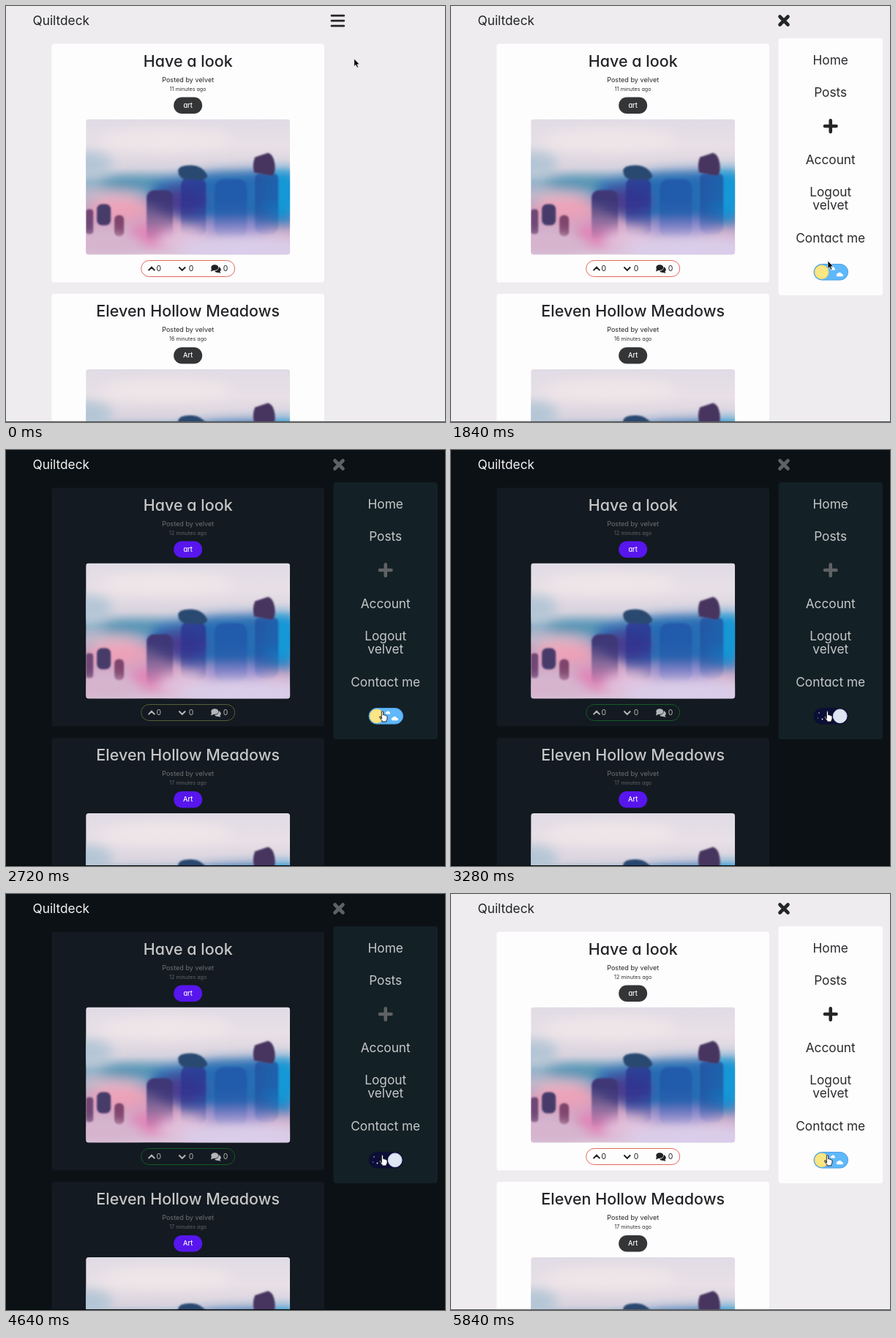
Animation of 600x568 px, one loop 5920 ms. Source, as an HTML page:

```html
<!DOCTYPE html>
<html lang="en">
<head>
<meta charset="utf-8">
<title>Theme toggle</title>
<style>
html, body { margin: 0; width: 100%; height: 100%; overflow: hidden; background: #eeecee; }
svg { display: block; }
#stage {
  --bg: #eeecee; --card: #fefdfe; --menu: #fefdfe; --brand: #222427; --title: #222427;
  --item: #2a2b2d; --meta: #25272a; --time: #303235; --tag: #343536; --icon: #202124;
  --close: #242527; --edge: #55585a;
  font-family: Inter, Lato, sans-serif; font-feature-settings: "cv11";
}
#stage.dark {
  --bg: #0b1115; --card: #131a21; --menu: #132026; --brand: #f3f3f3; --title: #c6c6c6;
  --item: #c6c8c9; --meta: #6c7073; --time: #5f6366; --tag: #5716ed; --icon: #b4b6b8;
  --close: #5f6264; --edge: #05080a;
}
.bg { fill: var(--bg); }
.card { fill: var(--card); }
.menu { fill: var(--menu); }
.brand { fill: var(--brand); font-size: 17.3px; }
.title { fill: var(--title); font-size: 21.5px; font-weight: 500; }
.item { fill: var(--item); font-size: 17.3px; }
.meta { fill: var(--meta); font-size: 9.1px; }
.time { fill: var(--time); font-size: 7.2px; }
.tag { fill: var(--tag); }
.tagText { fill: #fff; font-size: 9.2px; font-weight: 500; }
.count { fill: var(--icon); font-size: 10.5px; }
.icon { fill: var(--icon); }
.chevron { fill: none; stroke: var(--icon); stroke-width: 2; }
.close { stroke: var(--close); stroke-width: 4.6; stroke-linecap: round; }
.mid text { text-anchor: middle; }
.edge { fill: var(--edge); }
</style>
</head>
<body>
<svg id="stage" width="600" height="568" viewBox="0 0 600 568">
  <defs>
    <linearGradient id="sky" x2="0" y2="1">
      <stop stop-color="#e0dbe5"/>
      <stop offset=".2" stop-color="#e8e0e6"/>
      <stop offset=".36" stop-color="#d9d3de"/>
      <stop offset=".46" stop-color="#8db2c8"/>
      <stop offset=".56" stop-color="#a3adc8"/>
      <stop offset=".7" stop-color="#cd9fc0"/>
      <stop offset="1" stop-color="#dac8dd"/>
    </linearGradient>
    <linearGradient id="fade" x2="0" y2="1">
      <stop offset=".35" stop-color="#fff"/>
      <stop offset="1" stop-color="#fff" stop-opacity="0"/>
    </linearGradient>
    <filter id="haze" x="-60%" y="-60%" width="220%" height="220%"><feGaussianBlur stdDeviation="8"/></filter>
    <filter id="soft" x="-20%" y="-20%" width="140%" height="140%"><feGaussianBlur stdDeviation="1"/></filter>
    <clipPath id="frame"><rect width="279" height="185" rx="4"/></clipPath>
    <mask id="sink"><rect y="75" width="279" height="92" fill="url(#fade)"/></mask>
    <g id="photo" clip-path="url(#frame)">
      <rect width="279" height="185" fill="url(#sky)"/>
      <g filter="url(#haze)">
        <ellipse cx="110" cy="28" rx="90" ry="14" fill="#efe6e8"/>
        <ellipse cx="2" cy="62" rx="34" ry="18" fill="#b4c6d6"/>
        <ellipse cx="72" cy="88" rx="54" ry="8" fill="#4a8db0"/>
        <ellipse cx="22" cy="104" rx="50" ry="6" fill="#d3bdcb"/>
        <path d="M95 84L180 72 285 68V145L215 140 130 138 85 112Z" fill="#286cb4"/>
        <ellipse cx="268" cy="102" rx="28" ry="34" fill="#1497d6"/>
        <ellipse cx="130" cy="112" rx="34" ry="20" fill="#4a3c90"/>
        <ellipse cx="45" cy="123" rx="42" ry="15" fill="#eda2b8"/>
        <ellipse cx="92" cy="158" rx="34" ry="17" fill="#df85b6"/>
        <ellipse cx="205" cy="150" rx="48" ry="12" fill="#9c93d2"/>
      </g>
      <g filter="url(#soft)">
        <g mask="url(#sink)">
          <rect x="83" y="97" width="36" height="70" rx="10" fill="#3f3876"/>
          <rect x="130" y="80" width="34" height="80" rx="10" fill="#2c3290" opacity=".8"/>
          <rect x="176" y="82" width="44" height="80" rx="12" fill="#2050a6" opacity=".6"/>
          <rect x="231" y="72" width="32" height="85" rx="10" fill="#214f9f" opacity=".75"/>
        </g>
        <path d="M126 70Q128 62 145 63 160 64 166 77 166 83 155 83L134 82Q126 79 126 70Z" fill="#2b4871"/>
        <path d="M231 52L249 46Q256 48 258 60 260 75 254 77L230 73Q227 62 231 52Z" fill="#46345f"/>
        <rect x="0" y="123" width="10" height="34" rx="4" fill="#704675"/>
        <rect x="15" y="116" width="19" height="29" rx="7" fill="#463a6a"/>
        <rect x="39" y="131" width="13" height="29" rx="6" fill="#80446d"/>
      </g>
      <g filter="url(#haze)">
        <ellipse cx="28" cy="172" rx="52" ry="14" fill="#d6b3cd"/>
        <ellipse cx="130" cy="166" rx="32" ry="16" fill="#e2c3dd" opacity=".9"/>
        <ellipse cx="215" cy="178" rx="85" ry="18" fill="#dacdea"/>
      </g>
    </g>
  </defs>

  <rect class="bg" width="600" height="568"/>
  <text class="brand" x="36.5" y="26">Quiltdeck</text>
  <g id="feed"></g>

  <path id="bars" d="M445 13.2H461.8M445 20.2H461.8M445 27.2H461.8" stroke="#242527" stroke-width="2.8" stroke-linecap="round"/>

  <g id="nav">
    <path class="close" d="M449.5 14.5L460.5 25.5M460.5 14.5L449.5 25.5"/>
    <rect class="menu" x="447.5" y="44" width="142.5" height="351" rx="4"/>
    <g id="items" class="mid"></g>
    <path class="close" d="M511 164H526.5M518.75 156.2V171.8"/>
    <rect id="track" x="496" y="352.5" width="46.6" height="21.6" rx="10.8"/>
    <g id="clouds" fill="#fff">
      <path d="M519.5 360.5a1.6 1.6 0 0 1 .6-3 2.3 2.3 0 0 1 4.2.8 1.2 1.2 0 0 1 .3 2.2Z"/>
      <path d="M528 369.3a2.1 2.1 0 0 1 .4-4 3.2 3.2 0 0 1 5.8 .6 1.8 1.8 0 0 1 .8 3.4Z"/>
    </g>
    <g id="stars" fill="#fff">
      <circle cx="503" cy="359" r=".7"/><circle cx="507.5" cy="367.5" r=".9"/>
      <circle cx="514" cy="357.5" r=".7"/><circle cx="501.5" cy="366" r=".5"/>
    </g>
    <circle id="knob" cy="363.3" r="9.4" stroke-width="1"/>
  </g>

  <rect class="edge" y="567" width="600" height="1"/>
  <path id="arrow" d="M0 0V10.6L2.4 8.4 4 12.2 5.9 11.4 4.3 7.7H7.6Z" fill="#050505" stroke="#fff" stroke-width=".7"/>
  <path id="hand" d="M-1.7 4V-5Q-1.7 -6.4 -.6 -6.4T.6 -5V-1.2Q2.2 -2 2.7 -.8 4.2 -1.3 4.6 0 6 -.2 6 1.4V3.4Q6 5.3 4.7 6.8V8H-.9V6.8Q-2.6 5.1 -4.4 1.9 -4.6 .4 -3.2 .7Z" fill="#fff" stroke="#111" stroke-width=".9"/>
</svg>
<script>
const LOOP = 5920, STEP = 80;
const OPEN = 800, NIGHT = 2480, DAY = 4880, GRAB = 1960;
const $ = id => document.getElementById(id);

const card = (top, title, tag) => `
  <g transform="translate(0 ${top})">
    <rect class="card" x="62.3" y="0" width="372.7" height="326" rx="4"/>
    <g class="mid">
      <text class="title" x="248.7" y="31">${title}</text>
      <text class="meta" x="248.7" y="52">Posted by velvet</text>
      <text class="time" x="248.7" y="64.3"></text>
      <rect class="tag" x="229.2" y="73" width="39" height="22.6" rx="11.3"/>
      <text class="tagText" x="248.7" y="87.2">${tag}</text>
    </g>
    <use href="#photo" x="109.2" y="103"/>
    <rect class="votes" x="184.7" y="296" width="128" height="22" rx="11" fill="none"/>
    <path class="chevron" d="M194.6 309.6L199 305.2 203.4 309.6M236.4 305L240.8 309.4 245.2 305"/>
    <g class="icon">
      <ellipse cx="285.3" cy="305.6" rx="5" ry="3.9"/>
      <path d="M281.2 306L280 311 285 309ZM291 304.6Q296 308 292.4 311.3L293.6 313.2 290 312.4Q286.4 312.6 285 310.4 291 309.8 291 304.6Z"/>
    </g>
    <g class="count">
      <text x="205.6" y="310.8">0</text><text x="249.8" y="310.8">0</text><text x="296.8" y="310.8">0</text>
    </g>
  </g>`;

$('feed').innerHTML = card(51.5, 'Have a look', 'art') + card(393, 'Eleven Hollow Meadows', 'Art');
$('items').innerHTML = [['Home', 80], ['Posts', 124], ['Account', 216], ['Logout', 260], ['velvet', 278], ['Contact me', 323]]
  .map(([label, y]) => `<text class="item" x="518.7" y="${y}">${label}</text>`).join('');

const times = document.querySelectorAll('.time');
const votes = document.querySelectorAll('.votes');
// time, x, y of the pointer tip
const path = [[0, 475.7, 72], [160, 475.7, 72], [600, 457.5, 22], [960, 457.5, 22], [1280, 566, 72], [1840, 515, 348], [GRAB, 515, 363]];

const ramp = (t, from, span) => Math.min(1, Math.max(0, (t - from) / span));
const smooth = u => u * u * (3 - 2 * u);
const easeOut = u => 1 - (1 - u) ** 2;
const mix = (a, b, u) => a + (b - a) * u;
const blend = (a, b, u) => `rgb(${a.map((v, i) => Math.round(mix(v, b[i], u)))})`;
const show = (id, on) => $(id).setAttribute('visibility', on ? 'visible' : 'hidden');
const place = (id, x, y) => $(id).setAttribute('transform', `translate(${x} ${y})`);

function pointer(t) {
  const i = path.findIndex(p => p[0] > t);
  if (i < 0) return path[path.length - 1].slice(1);
  const [t0, x0, y0] = path[i - 1], [t1, x1, y1] = path[i];
  const u = smooth(ramp(t, t0, t1 - t0));
  return [mix(x0, x1, u), mix(y0, y1, u)];
}

function draw(t) {
  $('stage').classList.toggle('dark', t >= NIGHT && t < DAY);
  show('bars', t < OPEN);
  $('nav').style.display = t < OPEN ? 'none' : '';

  const later = t >= NIGHT ? 1 : 0;
  times.forEach((el, i) => el.textContent = `${[11, 16][i] + later} minutes ago`);

  const green = easeOut(ramp(t, NIGHT, 560)) - easeOut(ramp(t, DAY, 560));
  votes.forEach(el => el.setAttribute('stroke', blend([224, 104, 94], [18, 92, 38], green)));

  const night = smooth(ramp(t, NIGHT + 240, 500)) - smooth(ramp(t, DAY + 240, 500));
  $('track').setAttribute('fill', blend([95, 184, 250], [11, 14, 54], night));
  $('track').setAttribute('stroke', blend([76, 160, 230], [10, 15, 42], night));
  $('knob').setAttribute('cx', mix(506.6, 531.7, night));
  $('knob').setAttribute('fill', blend([251, 230, 133], [222, 229, 243], night));
  $('knob').setAttribute('stroke', blend([241, 213, 105], [201, 211, 233], night));
  $('clouds').setAttribute('opacity', 1 - night);
  $('stars').setAttribute('opacity', night);

  const [x, y] = pointer(t);
  place('arrow', x, y);
  place('hand', x, y);
  show('arrow', t < GRAB);
  show('hand', t >= GRAB);
}

const start = performance.now();
function tick() {
  const t = (performance.now() - start) % LOOP;
  draw(Math.floor(t / STEP) * STEP);
  requestAnimationFrame(tick);
}
tick();
</script>
</body>
</html>
```
